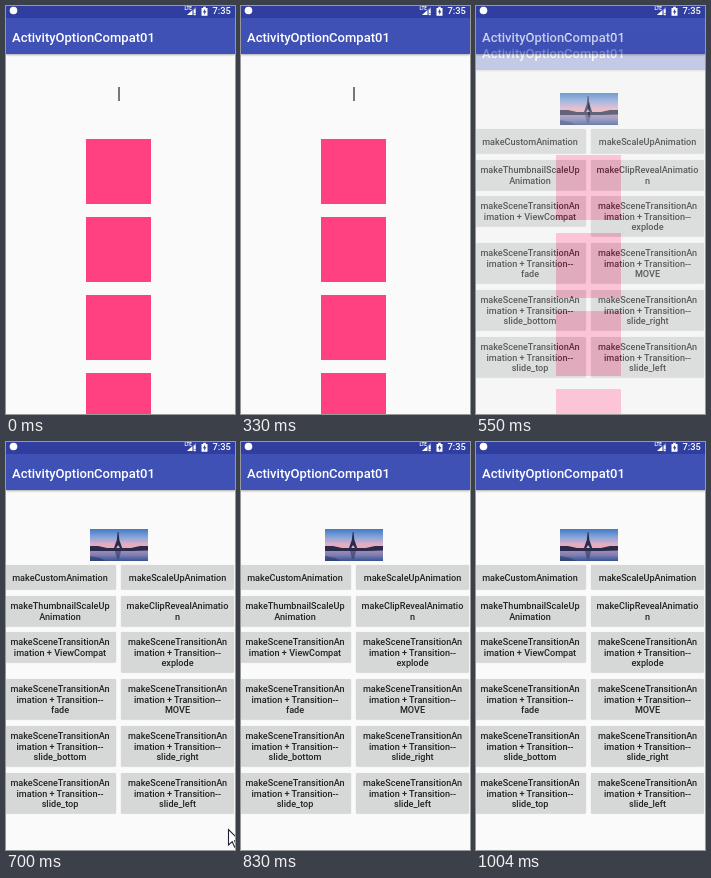
An HTML page for the animation above (1.12 s loop, 229 px wide and 408 px high).

```html
<!DOCTYPE html>
<html lang="en">
<head>
<meta charset="utf-8">
<title>Activity transition</title>
<style>
  html, body { margin: 0; width: 100%; height: 100%; overflow: hidden; }
  body { position: relative; background: #fafafa; font-family: Roboto, sans-serif; font-weight: 500; }
  div, svg { position: absolute; }

  .bar {
    left: 0; top: 12px; width: 229px; height: 36px;
    background: #3f51b5; color: #fff;
    font-size: 13px; line-height: 39px; text-indent: 6px; white-space: nowrap;
    box-shadow: 0 1px 2px rgba(0, 0, 0, .32);
  }
  .status { left: 0; top: 0; }

  .btn {
    left: -2px; width: 112px; height: 40px;
    display: flex; align-items: center; justify-content: center;
    padding-top: 2px; box-sizing: border-box;
    border-radius: 1px; background: #d6d7d7; color: #222;
    box-shadow: 0 .5px 1px rgba(0, 0, 0, .24);
    font-size: 9.1px; line-height: 10.8px; text-align: center; white-space: nowrap;
  }
  .right { left: 115px; width: 113px; }
  .one { height: 24px; }
  .two { height: 29.5px; }

  .photo { left: 84px; top: 87px; }

  /* The outgoing screen slides down while it fades. */
  .boxes { inset: 0; animation: leave 1120ms step-end infinite; }
  .paper { inset: 12px 0 0; background: #fafafa; animation: dim 1120ms step-end infinite; }
  .caret { left: 112px; top: 81px; width: 1.5px; height: 14px; background: #777; }
  .box { left: 80px; width: 65px; height: 65px; background: #ff4081; }

  .pointer { left: 221px; top: 386px; visibility: hidden; animation: point 1120ms step-end infinite; }

  @keyframes leave {
    0% { opacity: 1; transform: none; }
    49.107% { opacity: .29; transform: translateY(16px); }
    62.5%, 100% { opacity: 0; transform: translateY(16px); }
  }
  @keyframes dim {
    0% { background: #fafafa; }
    49.107%, 100% { background: #eee; }
  }
  @keyframes point {
    0% { visibility: hidden; }
    62.5% { visibility: visible; }
    74.107%, 100% { visibility: hidden; }
  }
</style>
</head>
<body>
  <div class="bar">ActivityOptionCompat01</div>

  <svg class="photo" width="58" height="32" viewBox="0 0 58 32">
    <defs>
      <linearGradient id="sky" x2="0" y2="1">
        <stop offset="0" stop-color="#3f7cc4"/>
        <stop offset=".4" stop-color="#86a3da"/>
        <stop offset=".75" stop-color="#dfaec6"/>
        <stop offset="1" stop-color="#f3a9ab"/>
      </linearGradient>
      <linearGradient id="water" x2="0" y2="1">
        <stop offset="0" stop-color="#b58db0"/>
        <stop offset=".5" stop-color="#7d80b4"/>
        <stop offset="1" stop-color="#38518f"/>
      </linearGradient>
    </defs>
    <path fill="url(#sky)" d="M0 0h58v20H0z"/>
    <path fill="url(#water)" d="M0 20h58v12H0z"/>
    <path fill="#2a2b4c" d="M0 17l8 0 9 2 24 0 9-2 8 0v4.5l-16 .5H14L0 22z"/>
    <path fill="#262c4d" d="M27.7 3h.8l.9 8 2.8 8h-2.2l-1.9-3-1.9 3H24l2.8-8z"/>
    <path fill="#2d3a66" opacity=".6" d="M25 22h6l-2 8h-2zM0 27l10 2 6 3H0z"/>
  </svg>

  <div class="btn one" style="top:123px">makeCustomAnimation</div>
  <div class="btn one right" style="top:123px">makeScaleUpAnimation</div>
  <div class="btn two" style="top:154px">makeThumbnailScaleUp<br>Animation</div>
  <div class="btn two right" style="top:154px">makeClipRevealAnimatio<br>n</div>
  <div class="btn two" style="top:190px">makeSceneTransitionAn<br>imation + ViewCompat</div>
  <div class="btn right" style="top:190px">makeSceneTransitionAn<br>imation + Transition--<br>explode</div>
  <div class="btn" style="top:237px">makeSceneTransitionAn<br>imation + Transition--<br>fade</div>
  <div class="btn right" style="top:237px">makeSceneTransitionAn<br>imation + Transition--<br>MOVE</div>
  <div class="btn" style="top:284px">makeSceneTransitionAn<br>imation + Transition--<br>slide_bottom</div>
  <div class="btn right" style="top:284px">makeSceneTransitionAn<br>imation + Transition--<br>slide_right</div>
  <div class="btn" style="top:331px">makeSceneTransitionAn<br>imation + Transition--<br>slide_top</div>
  <div class="btn right" style="top:331px">makeSceneTransitionAn<br>imation + Transition--<br>slide_left</div>

  <div class="boxes">
    <div class="paper"></div>
    <div class="bar">ActivityOptionCompat01</div>
    <div class="caret"></div>
    <div class="box" style="top:133px"></div>
    <div class="box" style="top:211px"></div>
    <div class="box" style="top:289px"></div>
    <div class="box" style="top:367px"></div>
  </div>

  <svg class="status" width="229" height="12" fill="#fff">
    <path fill="#303f9f" d="M0 0h229v12H0z"/>
    <circle cx="7.5" cy="4.5" r="3.8"/>
    <text x="178.5" y="3.6" font-size="4.6" font-weight="700">LTE</text>
    <path opacity=".45" d="M190 1v8h-9z"/>
    <path d="M186 4.6V9h-5zM188 3.5h1.5v3.5h-1.5zM188 8h1.5v1.3h-1.5z"/>
    <path d="M195.5 2h1.7V.8h2.6V2h1.7v7.7h-6z"/>
    <path fill="#303f9f" d="M199.1 2.8l-2.2 3.4h1.3v2.5l2.2-3.5h-1.3z"/>
    <text x="206.5" y="8.4" font-size="9.3">7:35</text>
  </svg>

  <svg class="pointer" width="8" height="20">
    <path d="M1.5 1.5v15.5l3.7-3.4 2.4 5.4 2.4-1-2.4-5.3h5z" fill="#fff" stroke="#1d2036" stroke-width="1.1"/>
  </svg>
</body>
</html>
```
